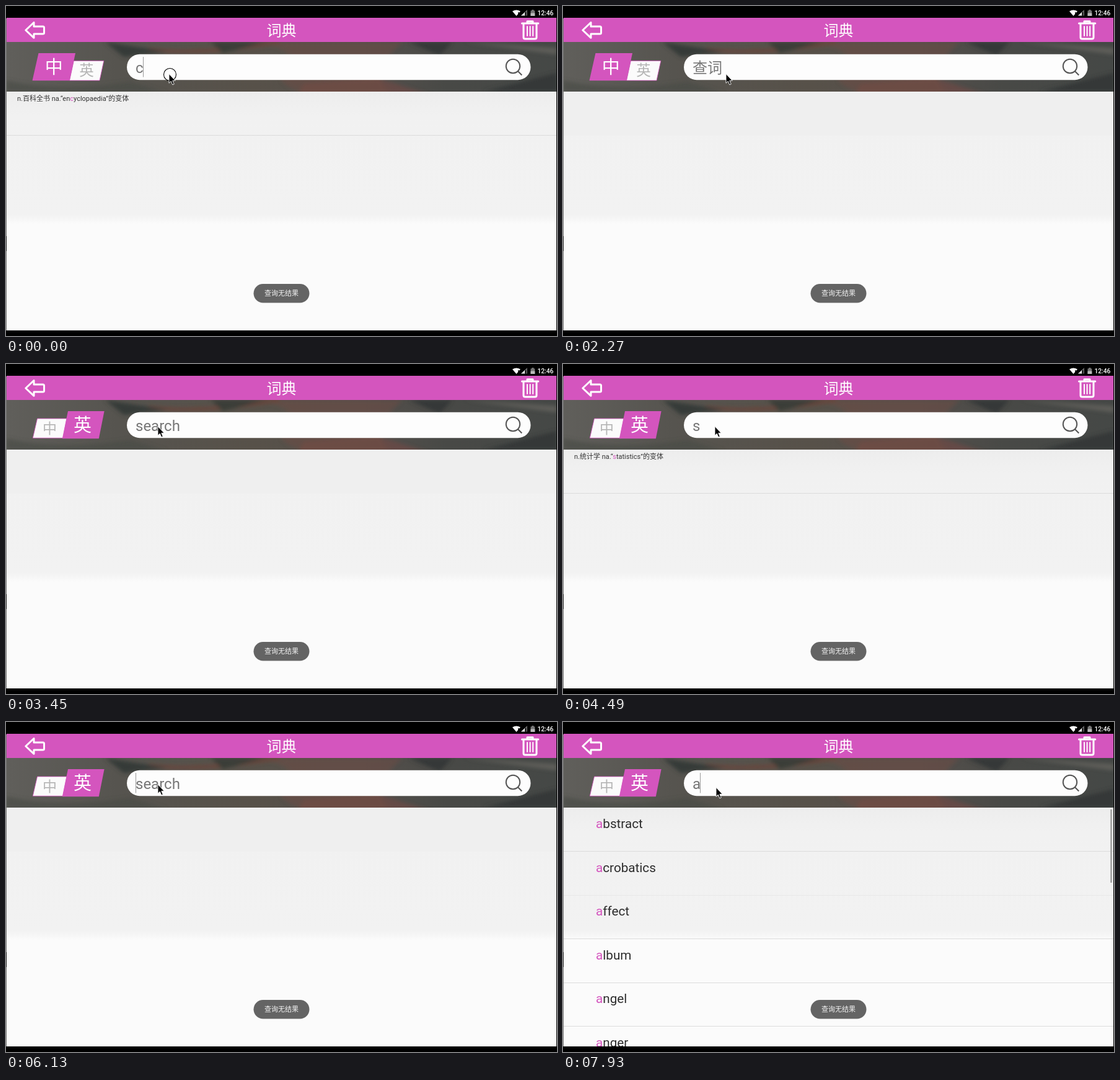
Animation, 889 px wide and 532 px high, one loop 8000 ms. Source, as an HTML page:

```html
<!DOCTYPE html>
<html lang="zh-CN">
<head>
<meta charset="utf-8">
<title>词典</title>
<style>
html, body { margin: 0; width: 100%; height: 100%; overflow: hidden; background: #000; }
svg { display: block; width: 889px; height: 532px; font-family: Roboto, "Noto Sans CJK SC", "Noto Sans CJK", sans-serif; }
.mid { text-anchor: middle; }
.pink { fill: #d455be; }
.line { fill: none; stroke: #fff; stroke-width: 3; stroke-linejoin: round; stroke-linecap: round; }
.idle { fill: #fbfbfb; stroke: #d455be; stroke-width: .8; }
</style>
</head>
<body>
<svg viewBox="0 0 889 532">
  <defs>
    <linearGradient id="page" gradientUnits="userSpaceOnUse" x1="0" y1="138" x2="0" y2="523">
      <stop offset="0" stop-color="#ededed"/><stop offset=".1" stop-color="#f1f1f1"/>
      <stop offset=".515" stop-color="#f2f2f2"/><stop offset=".555" stop-color="#fbfbfb"/>
    </linearGradient>
    <linearGradient id="photo">
      <stop offset="0" stop-color="#605f5b"/><stop offset=".2" stop-color="#56544f"/>
      <stop offset=".45" stop-color="#575149"/><stop offset=".65" stop-color="#55504c"/>
      <stop offset=".8" stop-color="#484946"/><stop offset="1" stop-color="#454846"/>
    </linearGradient>
    <clipPath id="banner"><rect x="1" y="58" width="887" height="80"/></clipPath>
    <clipPath id="body"><rect x="1" y="138" width="887" height="385"/></clipPath>
    <filter id="soft"><feGaussianBlur stdDeviation="3"/></filter>
  </defs>

  <rect width="889" height="532"/>
  <path d="M0 20H1V523H0Z" fill="#777"/>
  <path d="M0 371H1V395H0Z" fill="#222"/>

  <!-- status bar -->
  <path d="M817 8.5Q823.5 4.5 830 8.5L823.5 16Z" fill="#fff"/>
  <path d="M831 15.5L841 6V15.5Z" fill="#666"/>
  <path d="M831 15.5L837 10V15.5Z" fill="#ddd"/>
  <path d="M827 10V13.5M838.5 10V15.5" stroke="#000" stroke-width="1.5"/>
  <path d="M846.5 7.5H848.3V6H851.5V7.5H853.3V16H846.5Z" fill="#777"/>
  <path d="M846.5 11.5H853.3V16H846.5Z" fill="#bbb"/>
  <text x="857.5" y="14.5" font-size="10.2" font-weight="500" fill="#fff">12:46</text>

  <!-- title bar -->
  <rect class="pink" x="1" y="19" width="887" height="39"/>
  <path class="line" d="M31.8 39L45 26.5V33H59.5Q61.5 33 61.5 35V43Q61.5 45 59.5 45H45V51.3Z"/>
  <text class="mid" x="444.5" y="47.7" font-size="24" fill="#fff">词典</text>
  <path class="line" d="M832.5 28H858.8M841 27V24.8H850V27M835 29V50.5Q835 53 837.5 53H853.5Q856 53 856 50.5V29"/>
  <path class="line" style="stroke-width:2" d="M841 33V48M845.6 33V48M850.2 33V48"/>

  <!-- blurred banner -->
  <g clip-path="url(#banner)">
    <rect y="58" width="889" height="80" fill="url(#photo)"/>
    <g filter="url(#soft)">
      <path d="M400 58Q480 70 450 100T520 150L620 138Q580 110 640 58Z" fill="#6b4d45" opacity=".6"/>
      <path d="M480 125L600 116L690 145H470Z" fill="#744a43" opacity=".6"/>
      <path d="M230 70Q320 80 440 58" fill="none" stroke="#6b443a" stroke-width="5"/>
      <path d="M160 58L260 74L190 82Z" fill="#343b38"/>
      <path d="M330 58L420 58L350 76Z" fill="#3b3e37"/>
      <path d="M650 58H720L700 80ZM770 138L889 108V138Z" fill="#343938"/>
      <path d="M740 58L889 68V78Z" fill="#6b6963" opacity=".7"/>
      <path d="M0 120Q90 140 200 122L260 140H0Z" fill="#4a4c48" opacity=".7"/>
    </g>
  </g>

  <g id="zh">
    <path class="idle" d="M109.3 88.4H157.8L151 120H102.5Z"/>
    <path class="pink" d="M52.5 76H112L102.5 120.3H42.5Z"/>
    <text class="mid" x="77.3" y="109" font-size="29" fill="#fff">中</text>
    <text class="mid" x="130" y="112" font-size="23.5" fill="#b5b5b5">英</text>
  </g>
  <g id="en">
    <path class="idle" d="M50.5 88H98L92 119.3H43.3Z"/>
    <path class="pink" d="M100 76H158.6L149.8 120.3H90.8Z"/>
    <text class="mid" x="70.5" y="112" font-size="23" fill="#b5b5b5">中</text>
    <text class="mid" x="123.5" y="109" font-size="29" fill="#fff">英</text>
  </g>

  <rect x="195" y="77.7" width="651.5" height="41.5" rx="20.7" fill="#fdfdfd"/>
  <g fill="none" stroke="#555" stroke-width="2">
    <circle cx="818" cy="97" r="11.2"/><path d="M825.8 105L832.3 111.5"/>
  </g>
  <text id="query" x="209" y="107.7" font-size="24" fill="#777"></text>
  <path id="typo" d="M209 111H235" stroke="#ee6a62" stroke-width="1.6"/>
  <rect id="caret" y="82" width="1" height="32.5" fill="#999"/>

  <!-- results -->
  <rect x="1" y="138" width="887" height="385" fill="url(#page)"/>
  <rect id="blank" x="1" y="138" width="887" height="71" fill="#efefef"/>
  <g id="list" clip-path="url(#body)"></g>

  <rect x="399.5" y="448" width="90" height="30.5" rx="15.2" fill="#646464"/>
  <text class="mid" x="444.5" y="467.3" font-size="11" fill="#f2f2f2">查询无结果</text>

  <g id="mouse">
    <circle id="ring" cx="1.5" cy=".5" r="10" fill="none" stroke="#000" stroke-width="1.1"/>
    <path d="M0 -.5V14.3L3.3 11.2L5.8 17L8.2 16L5.8 10.3H10.2Z" stroke="#fff" stroke-width=".9"/>
  </g>
</svg>
<script>
const el = id => document.getElementById(id);
const show = (id, on) => el(id).setAttribute('visibility', on ? 'visible' : 'hidden');

const note = (a, key, b) => `<path d="M1 208.5H888" stroke="#dcdcdc"/>
  <text x="18" y="153" font-size="11" fill="#333">${a}<tspan class="pink">${key}</tspan>${b}</text>`;
const words = ['bstract', 'crobatics', 'ffect', 'lbum', 'ngel', 'nger'].map((w, i) => {
  const y = i * 70.6;
  return `<text x="53" y="${171 + y}" font-size="20.7" fill="#2d2d2d"><tspan class="pink">a</tspan>${w}</text>
    <path d="M1 ${Math.round(208 + y) + .5}H888" stroke="${i == 1 ? '#e8e8e8' : '#dcdcdc'}"/>`;
}).join('') + '<rect x="883" y="141" width="3" height="118" fill="#a9a9a9"/>';
const lists = {
  none: '',
  c: note('n.百科全书 na.“en', 'c', 'yclopaedia”的变体'),
  s: note('n.统计学 na.“', 's', 'tatistics”的变体'),
  a: words
};

// Each step lists only what changes; caret 0 means hidden.
const steps = [
  [0, { q: 'c', list: 'c', caret: 221, x: 263, y: 110, ring: 1, en: 0 }],
  [150, { ring: 0 }],
  [330, { caret: 0 }],
  [920, { caret: 221 }],
  [1370, { caret: 0 }],
  [1820, { q: '查词', list: 'none', caret: 209 }],
  [2270, { caret: 0 }],
  [2420, { x: 222, y: 107 }],
  [2560, { x: 150, y: 98 }],
  [2710, { x: 107, y: 94, caret: 209 }],
  [2860, { ring: 1 }],
  [3010, { ring: 0, en: 1, q: 'search' }],
  [3150, { x: 135, y: 100, caret: 0 }],
  [3300, { x: 207, y: 107 }],
  [3450, { x: 245, y: 101 }],
  [3600, { ring: 1, caret: 209 }],
  [3740, { ring: 0 }],
  [4040, { q: 's', list: 's', caret: 221 }],
  [4490, { caret: 0 }],
  [4940, { q: 'sd', list: 'none', caret: 234 }],
  [5540, { caret: 0 }],
  [5980, { q: 's', caret: 221 }],
  [6130, { q: 'search', caret: 209 }],
  [6730, { q: 'a', caret: 221 }],
  [7030, { list: 'a' }],
  [7480, { caret: 0, x: 247, y: 106 }],
  [7930, { caret: 221 }]
];

let last = -1;
function draw(now) {
  const t = now % 8000;
  const count = steps.filter(([at]) => at <= t).length;
  if (count != last) {
    last = count;
    const s = Object.assign({}, ...steps.slice(0, count).map(step => step[1]));
    el('query').textContent = s.q;
    el('list').innerHTML = lists[s.list];
    el('caret').setAttribute('x', s.caret);
    el('mouse').setAttribute('transform', `translate(${s.x} ${s.y})`);
    show('caret', s.caret);
    show('ring', s.ring);
    show('typo', s.q == 'sd');
    show('blank', s.list == 'none');
    show('en', s.en);
    show('zh', !s.en);
  }
  requestAnimationFrame(draw);
}
draw(0);
</script>
</body>
</html>
```
